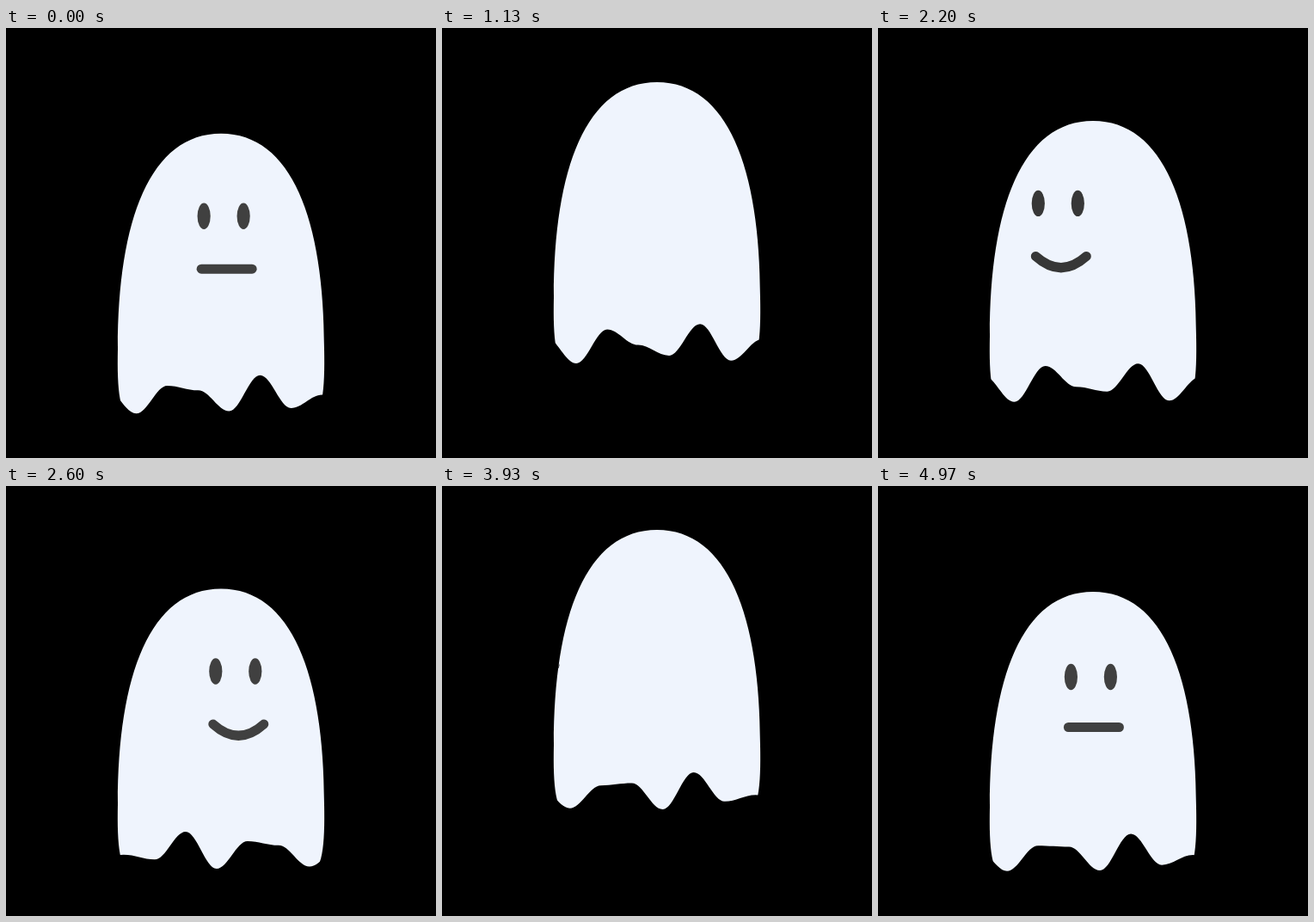
Write an HTML page with a canvas that moves like this. It is 500 px wide and 500 px high and loops after 5010 ms.

```html
<!DOCTYPE html>
<html lang="en">
<head>
<meta charset="utf-8">
<title>Ghost</title>
<style>
html, body { margin: 0; height: 100%; overflow: hidden; background: #000; }
canvas { display: block; }
</style>
</head>
<body>
<canvas id="stage" width="500" height="500"></canvas>
<script>
const ctx = document.getElementById('stage').getContext('2d');
const LOOP = 5010, TURN = LOOP / 2, RIPPLE = LOOP / 5;

// Height of the head over one turn: [ms, y]
const BOB = [[-210, 116], [-40, 123], [95, 119.5], [195, 116], [570, 97], [695, 87.5],
  [1130, 63], [1265, 56], [1425, 51], [1600, 58], [1800, 72], [2170, 105],
  [2295, 116], [2465, 123], [2600, 119.5]];

const mod = (a, n) => ((a % n) + n) % n;
const clamp = v => Math.max(0, Math.min(1, v));

// Smooth curve through the key points
function bob(t) {
  let i = 1;
  while (t >= BOB[i + 1][0]) i++;
  const [a, b, c, d] = BOB.slice(i - 1, i + 3);
  const w = c[0] - b[0], s = (t - b[0]) / w;
  const m = w * (c[1] - a[1]) / (c[0] - a[0]);
  const n = d ? w * (d[1] - b[1]) / (d[0] - b[0]) : 0;
  const e = s * s * (3 - 2 * s);
  return b[1] + (c[1] - b[1]) * e + m * s * (1 - s) ** 2 - n * s * s * (1 - s);
}

function clipBody() {
  ctx.beginPath();
  ctx.moveTo(130, 250);
  ctx.bezierCurveTo(130, 100, 168, 0, 250, 0);
  ctx.bezierCurveTo(332, 0, 370, 100, 370, 250);
  ctx.bezierCurveTo(371, 300, 368, 328, 352, 332);
  ctx.lineTo(148, 332);
  ctx.bezierCurveTo(132, 328, 129, 300, 130, 250);
  ctx.clip();
}

// Hem points drift right while their depth follows a fixed wave
function drawSheet(t) {
  const step = 36, handle = 13;
  const phase = mod((t - 600) / RIPPLE, 1);
  ctx.beginPath();
  ctx.moveTo(0, -5);
  let px = 0, py = 320;
  ctx.lineTo(px, py);
  for (let j = -2; j <= 8; j++) {
    const u = j + phase, x = 137 + step * u;
    const overhang = Math.max(0, Math.abs(x - 250) - 120);
    const y = 304 + 23 * Math.cos(2 * Math.PI * (u - 0.55) / 2.6) + overhang;
    ctx.bezierCurveTo(px + handle, py, x - handle, y, x, y);
    [px, py] = [x, y];
  }
  ctx.lineTo(px, -5);
  ctx.fillStyle = '#eff4fd';
  ctx.fill();
}

function drawFace(t) {
  const x = 73 + 360 * mod(t / TURN + 0.5, 1);
  const smiling = t >= TURN / 2 && t < TURN * 1.5;
  const side = clamp((Math.abs(x - 250) - 25) / 65);
  const gray = Math.round(64 * (1 - side * side * (3 - 2 * side)));
  const eyeY = 96 + 3 * clamp((t - 4500) / 470);
  ctx.fillStyle = ctx.strokeStyle = `rgb(${gray},${gray},${gray})`;
  for (const dx of [-23, 23]) {
    ctx.beginPath();
    ctx.ellipse(x + dx, eyeY, 7.6, 15.2, 0, 0, 2 * Math.PI);
    ctx.fill();
  }
  ctx.lineWidth = 11;
  ctx.lineCap = 'round';
  ctx.beginPath();
  ctx.moveTo(x - 26, 157.5);
  ctx.quadraticCurveTo(x + 3.5, smiling ? 184 : 157.5, x + 33, 157.5);
  ctx.stroke();
}

function frame(now) {
  const t = now % LOOP;
  ctx.clearRect(0, 0, 500, 500);
  ctx.save();
  ctx.translate(0, bob(t % TURN));
  clipBody();
  drawSheet(t);
  drawFace(t);
  ctx.restore();
  requestAnimationFrame(frame);
}
frame(0);
</script>
</body>
</html>
```
